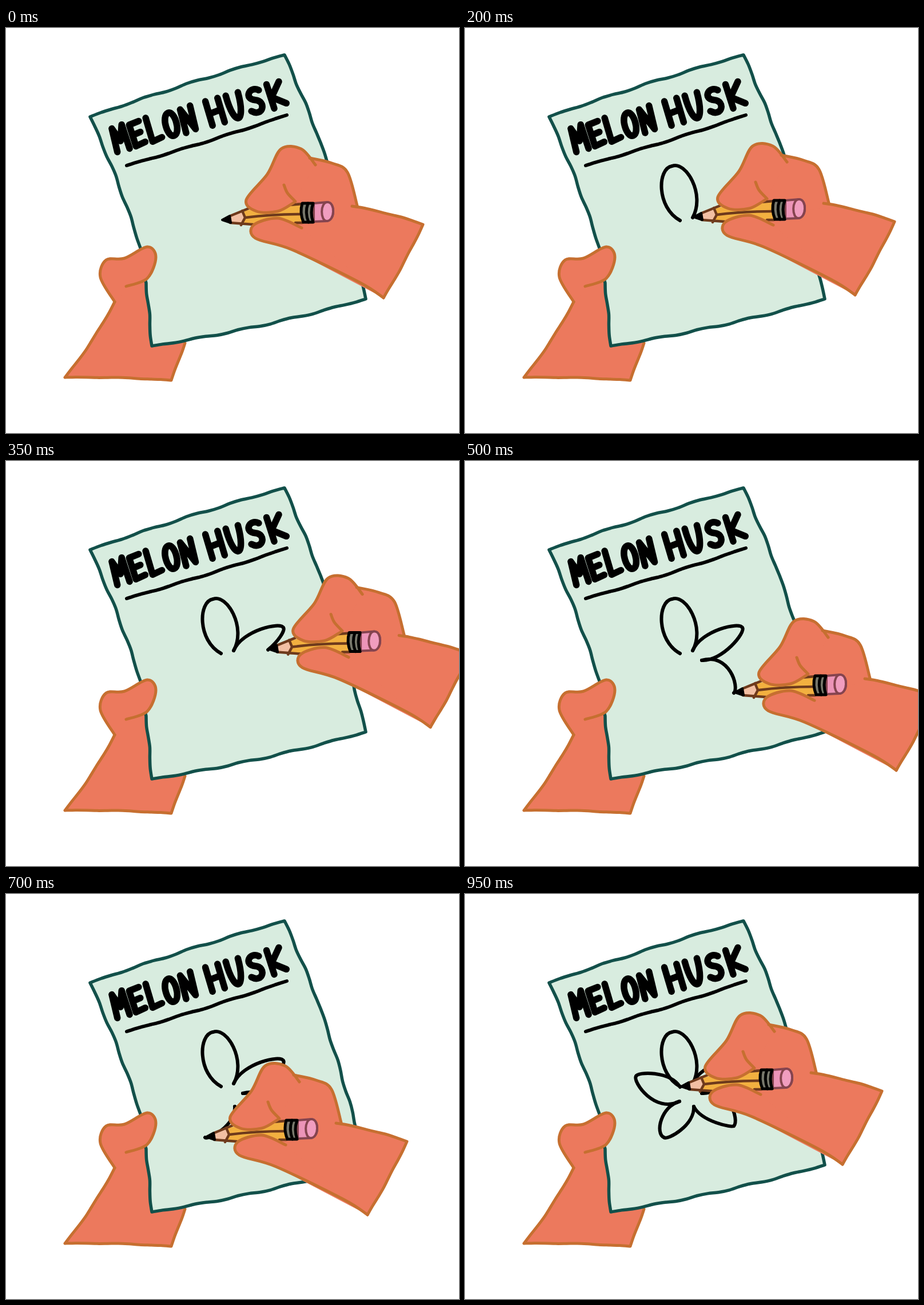
An HTML page that plays this animation: 792 by 707 pixels, repeating every 1000 ms.

```html
<!DOCTYPE html>
<html lang="en">
<head>
<meta charset="utf-8">
<title>Drawing a flower</title>
<style>
html, body { margin: 0; width: 100%; height: 100%; overflow: hidden; background: #fff; }
svg { display: block; width: 792px; height: 707px; }
path { stroke-linecap: round; stroke-linejoin: round; }
</style>
</head>
<body>
<svg viewBox="0 0 792 707">
  <g id="sheet"></g>
  <g id="title" role="img" aria-label="MELON HUSK" transform="translate(183 174) rotate(-15.5)"></g>
  <g id="ink"></g>
  <g id="thumb"></g>
  <g id="hand"></g>
</svg>
<script>
const SKIN = '#ec795d', EDGE = '#c66f30', PAPER = '#d8ecdf', TEAL = '#12504a';
const BROWN = '#6e3a1c', ROSE = '#85444f', INK = '#000';
const [sheet, title, ink, thumb, hand] =
  ['sheet', 'title', 'ink', 'thumb', 'hand'].map(id => document.getElementById(id));

function add(parent, d, fill = 'none', stroke = 'none', width = 5) {
  const p = document.createElementNS('http://www.w3.org/2000/svg', 'path');
  for (const [key, value] of Object.entries({ d, fill, stroke, 'stroke-width': width })) {
    p.setAttribute(key, value);
  }
  return parent.appendChild(p);
}

const points = text => text.split(' ').map(s => s.split(',').map(Number));
const lerp = (a, b, u) => a.map((v, k) => v + (b[k] - v) * u);

// Point beside the line a-b, at share u along it and off to its left
function beside(a, b, u, off) {
  const dx = b[0] - a[0], dy = b[1] - a[1], len = Math.hypot(dx, dy);
  const [x, y] = lerp(a, b, u);
  return [x + dy / len * off, y - dx / len * off];
}

// Smooth curve through points
function smooth(pts) {
  let d = 'M' + pts[0];
  for (let i = 0; i < pts.length - 1; i++) {
    const b = pts[i], c = pts[i + 1], a = pts[i - 1] || b, e = pts[i + 2] || c;
    const c1 = b.map((v, k) => v + (c[k] - a[k]) / 6);
    const c2 = c.map((v, k) => v - (e[k] - b[k]) / 6);
    d += `C${c1} ${c2} ${c}`;
  }
  return d;
}
const curve = text => smooth(points(text));

// Hand-drawn polyline: each side bows out and wavers a little
function sketch(text, bows, waver) {
  const corners = points(text);
  return bows.map((bow, i) => {
    const a = corners[i], b = corners[i + 1];
    const n = Math.ceil(Math.hypot(b[0] - a[0], b[1] - a[1]) / 20);
    const side = Array.from({ length: n + 1 }, (_, k) => {
      const u = k / n, swell = 4 * u * (1 - u);
      return beside(a, b, u, bow * swell + waver * Math.sin(k * 1.5) * Math.sqrt(swell));
    });
    const d = smooth(side);
    return i ? d.slice(d.indexOf('C')) : d;
  }).join('');
}

// Holding arm, sheet and thumb
const arm = sketch('190,478 103,610 289,615 313,550', [4, 2, 0], .6);
add(sheet, arm + 'L300,470 250,420 200,430Z', SKIN);
add(sheet, arm, 'none', EDGE);
add(sheet, sketch('147,155 487,47 550,200 629,473 255,555 245,445 235,384 147,155',
  [3, 1, 3, 6, 0, 0, -4], 1.5) + 'Z', PAPER, TEAL, 5.5);
add(sheet, sketch('211,240 491,152', [-2], 1), 'none', INK, 6);

const grip = curve('190,478 165,435 175,405 207,402 247,382 262,400 247,437 210,451');
add(thumb, grip + 'L200,470Z', SKIN);
add(thumb, grip, 'none', EDGE);

// Lettering
const glyphs = {
  M: 'M0,44L2,2 14,27 27,0 30,44',
  E: 'M26,2L2,4 4,43 28,40M3,23L23,21',
  L: 'M2,0L3,43 27,40',
  O: 'M14,2C-4,4 -3,44 14,43C32,42 31,0 14,2Z',
  N: 'M1,44L2,2 25,42 27,0',
  H: 'M2,0L3,44M27,0L28,44M3,23L27,21',
  U: 'M2,0C2,60 27,56 27,0',
  S: 'M26,6C10,-6 -8,14 14,21S20,54 1,38',
  K: 'M2,0L4,44M27,1L5,24 30,41'
};
function letter(word, x, advance) {
  [...word].forEach((ch, i) => {
    const p = add(title, glyphs[ch], 'none', INK, 11.5);
    p.setAttribute('vector-effect', 'non-scaling-stroke');
    p.setAttribute('transform', `translate(${x + i * advance} 0) scale(${advance / 42} 1)`);
  });
}
letter('MELON', 0, 31);
letter('HUSK', 170, 37);

// Writing hand, drawn with the pencil point at REST
const REST = [376, 336];
const cuff = sketch('605,311 729,343 660,471', [3, 2], .6);
const back = curve('531,227 570,236 597,252 614,310');
const index = curve('541,239 516,211 481,211 457,255 420,300 438,320 475,320 503,305');
const lower = curve('660,471 618,444 500,387 436,367 433,344 475,332 517,349');

add(hand, cuff + 'L500,387 470,345 500,318 560,250Z', SKIN);
add(hand, back + 'L605,320 490,330 510,230Z', SKIN);

add(hand, 'M412,319L518,306V340L411,344Z', '#f2b040');
add(hand, 'M377,336L413,319 418,331 411,344Z', '#f2bfa3');
add(hand, 'M392,340L432,343M392,328L424,315M413,319L418,331 411,344M418,331Q465,325 516,325' +
  'M495,309L518,307M506,340H518', 'none', BROWN, 4.5);
add(hand, 'M378,335L391,328 393,340Z', INK, INK, 4);
add(hand, 'M538,306L562,304Q572,306 572,320T561,337L538,338Z', '#ec94b8', ROSE, 4);
add(hand, 'M562,304C549,304 549,337 561,337C575,337 576,304 562,304Z', '#f09dbf', ROSE, 4);
add(hand, 'M518,306H537Q531,322 537,339H520Q513,322 518,306Z', '#77776b', INK);
add(hand, 'M528,306Q522,322 529,339', 'none', INK);

for (const finger of [index, lower]) {
  add(hand, finger + 'Z', SKIN);
  add(hand, finger, 'none', EDGE);
}
for (const line of [back, cuff, curve('486,274 492,288 506,303')]) add(hand, line, 'none', EDGE);

// Petal sides in drawing order: step at which each ends, end point, belly, roundness at the petal tip
const sides = [
  [2, 362, 241, 38, 26], [4, 398, 331, 36, 26],
  [6, 485, 291, 26, 12], [8, 414, 348, 24, 10],
  [10, 470, 405, 44, 14], [12, 400, 371, 18, 4],
  [14, 348, 425, 24, 8], [15.5, 375, 362, 26, 18],
  [17, 299, 318, 40, 12], [19, 376, 337, 24, 8]
];
let pen = REST, lastStep = 0;
const strokes = sides.map(([to, x, y, belly, round], i) => {
  const end = [x, y], outward = i % 2 === 0;
  const [c1, c2] = outward
    ? [beside(pen, end, .3, belly), beside(pen, end, 1, round)]
    : [beside(pen, end, 0, round), beside(pen, end, .7, belly)];
  const path = add(ink, `M${pen}C${c1} ${c2} ${end}`, 'none', INK, 6);
  const stroke = { from: lastStep, to, path, length: path.getTotalLength() };
  pen = end;
  lastStep = to;
  return stroke;
});

function draw(ms) {
  const step = Math.floor(ms % 1000 / 50);
  let tip = { x: REST[0], y: REST[1] };
  for (const { from, to, path, length } of strokes) {
    const part = Math.min(1, Math.max(0, (step - from) / (to - from)));
    path.style.display = part ? '' : 'none';
    path.style.strokeDasharray = part < 1 ? `${part * length} ${length * 2}` : 'none';
    if (part) tip = path.getPointAtLength(part * length);
  }
  hand.setAttribute('transform', `translate(${tip.x - REST[0]} ${tip.y - REST[1]})`);
}

const start = performance.now();
function loop() {
  draw(performance.now() - start);
  requestAnimationFrame(loop);
}
draw(0);
requestAnimationFrame(loop);
</script>
</body>
</html>
```
